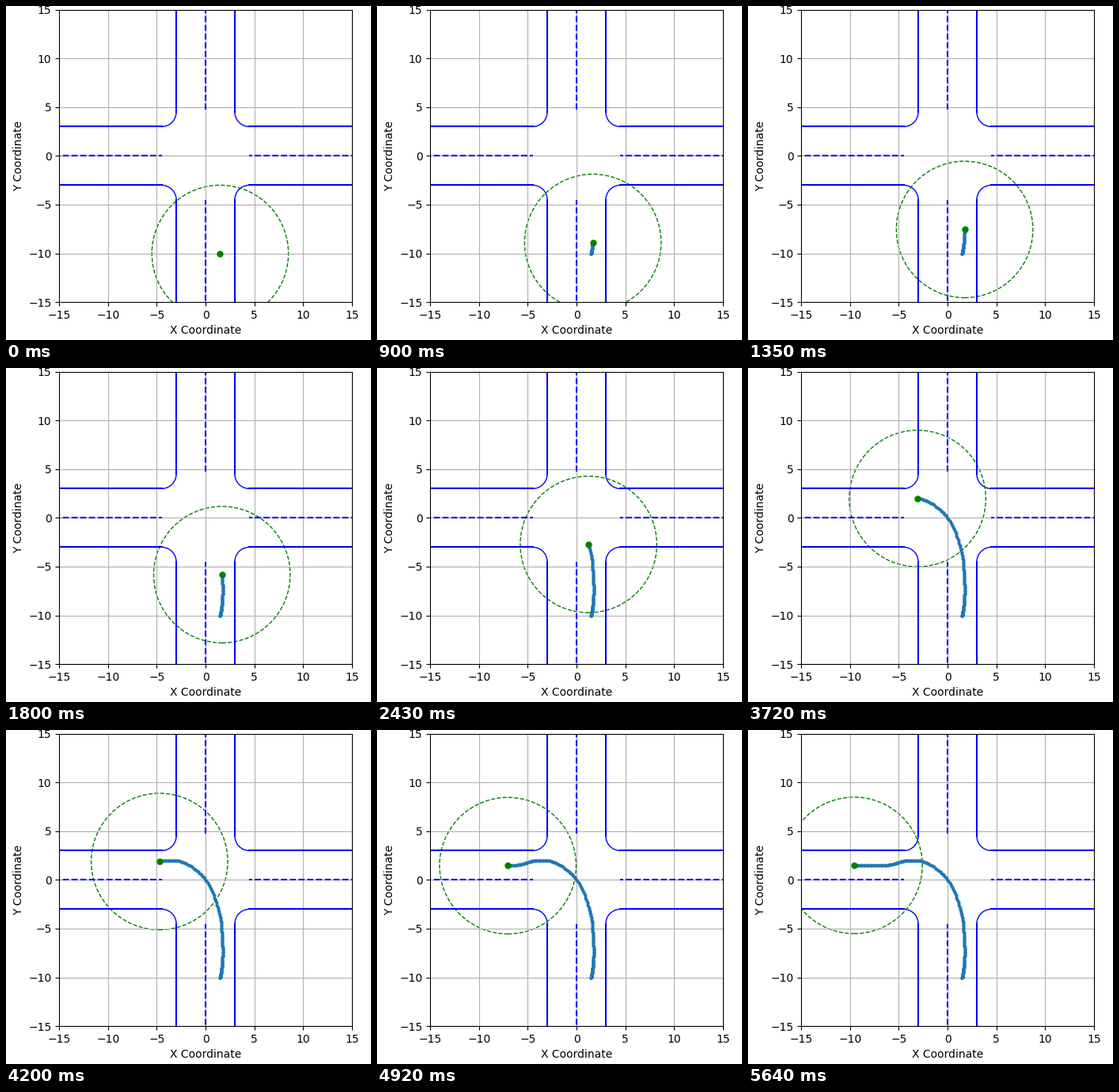
Recreate the animation shown at these times as a matplotlib script. Size 461 by 422 pixels, loop 5670 ms.

```python
import numpy as np
import matplotlib.pyplot as plt
from matplotlib.animation import FuncAnimation
from matplotlib.patches import Arc, Circle

W, H, DPI = 461, 422, 100
FRAMES, INTERVAL = 189, 30
LIMIT, LANE, CORNER = 15, 3, 4.5
SENSE_RADIUS = 7

# Key points of the left turn; the car pulls away from rest
KEY_STEPS = np.array([0, 57, 76, 95, 114, 133, 152, 187])
KEY_X = np.array([1.5, 1.7, 1.42, 0.12, -2.07, -4.14, -5.93, -9.58])
KEY_Y = np.array([-10, -6.07, -3.39, -0.15, 1.72, 1.98, 1.55, 1.49])


def hermite(t, knots, values):
    """Smooth curve through the knots, starting at rest."""
    slope = np.gradient(values, knots)
    slope[0] = 0
    k = np.clip(np.searchsorted(knots, t, side="right") - 1, 0, len(knots) - 2)
    h = knots[k + 1] - knots[k]
    u = (t - knots[k]) / h
    return ((1 + 2 * u) * (1 - u) ** 2 * values[k]
            + u * (1 - u) ** 2 * h * slope[k]
            + u ** 2 * (3 - 2 * u) * values[k + 1]
            + u ** 2 * (u - 1) * h * slope[k + 1])


steps = np.arange(FRAMES - 1)
path_x = hermite(steps, KEY_STEPS, KEY_X)
path_y = hermite(steps, KEY_STEPS, KEY_Y)

fig = plt.figure(figsize=(W / DPI, H / DPI), dpi=DPI)
ax = fig.add_axes([67.2 / W, 47.8 / H, 369.6 / W, 369.6 / H])
ax.set(xlim=(-LIMIT, LIMIT), ylim=(-LIMIT, LIMIT),
       xlabel="X Coordinate", ylabel="Y Coordinate")
ticks = range(-LIMIT, LIMIT + 1, 5)
ax.set_xticks(ticks)
ax.set_yticks(ticks)
ax.grid(True)


def center_line(dx, dy, lead):
    """Dashes from the plot edge inwards, begun lead pixels outside it."""
    reach = np.array([LIMIT, CORNER])
    width = plt.rcParams["lines.linewidth"]
    phase = lead * 72 / DPI / width
    ax.plot(dx * reach, dy * reach, "b", ls=(phase, (3.7, 1.6)))


def draw_roads():
    for sx in (-1, 1):
        for sy in (-1, 1):
            ax.plot([sx * LANE] * 2, [sy * CORNER, sy * LIMIT], "b-")
            ax.plot([sx * CORNER, sx * LIMIT], [sy * LANE] * 2, "b-")
            start = np.degrees(np.arctan2(-sy, -sx)) - 45
            ax.add_patch(Arc((sx * CORNER, sy * CORNER), 3, 3,
                             theta1=start, theta2=start + 90, color="b"))
    center_line(-1, 0, 61.6)
    center_line(1, 0, 61.6)
    center_line(0, -1, 53.8)
    center_line(0, 1, 58.6)


draw_roads()
sensor = ax.add_patch(Circle((path_x[0], path_y[0]), SENSE_RADIUS,
                             fill=False, color="g", ls="--"))
trail, = ax.plot([], [], ".", color="tab:blue", ms=4)
car, = ax.plot([], [], "go", ms=5)


def update(frame):
    n = max(frame - 1, 0)
    pos = path_x[n], path_y[n]
    sensor.center = pos
    car.set_data([pos[0]], [pos[1]])
    trail.set_data(path_x[:n + 1], path_y[:n + 1])
    return sensor, trail, car


anim = FuncAnimation(fig, update, frames=FRAMES, interval=INTERVAL,
                     repeat=True, repeat_delay=0, blit=False)
plt.show()
```
